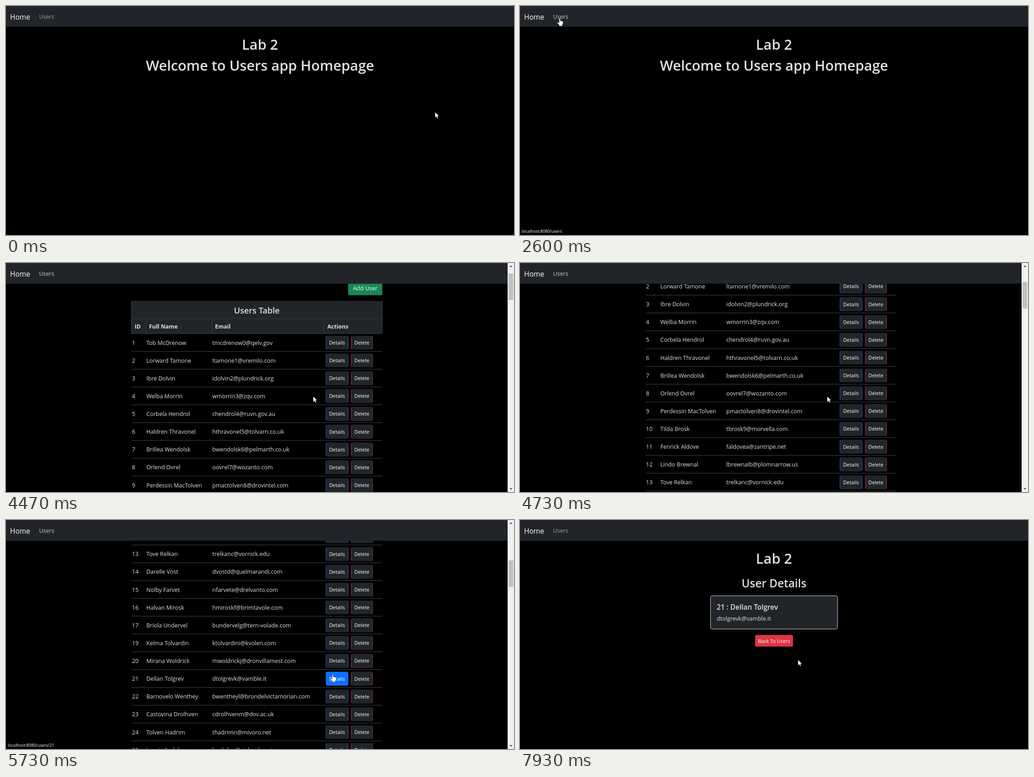
An HTML page that plays this animation: 1113x503 px, repeating every 8000 ms.

```html
<!DOCTYPE html>
<html lang="en">
<head>
<meta charset="utf-8">
<title>Users app</title>
<style>
@property --scroll { syntax: '<number>'; inherits: true; initial-value: 0; }
@property --hand { syntax: '<number>'; inherits: true; initial-value: 0; }

html, body { margin: 0; width: 100%; height: 100%; overflow: hidden; background: #000; }
svg { display: block; width: 100vw; height: 100vh; }
text { font: 12.5px 'Open Sans', 'Noto Sans', sans-serif; fill: #dee2e6; white-space: pre; }
.mid { text-anchor: middle; }
.h1 { font-size: 30.8px; font-weight: 600; }
.h2 { font-size: 24.4px; font-weight: 600; }
.h3 { font-size: 18.1px; font-weight: 600; }
.h5 { font-size: 15.4px; font-weight: 600; }
.th { font-size: 12.4px; font-weight: 700; }
.brand { font-size: 15.5px; }
.small { font-size: 10.9px; }
.status { font-size: 9.1px; }
.brand, .small, .status, .white { fill: #fff; }
.panel { fill: #212529; }
.rule { fill: none; stroke: #373b3e; }
.line { stroke: #41464b; }

/* 120 steps per loop; one step is 0.8333% */
svg, .home, .users, .details, .link, .up, .hot, .status, #cursor {
  animation: 8s step-end -4ms infinite;
}
svg { animation-name: scroll; }
.home { animation-name: home; }
.users { animation-name: users; }
.details { animation-name: details; }
.link { fill: #fff; animation-name: link; }
.up { animation-name: up; }
.hot { animation-name: hot; }
.list-url { animation-name: list-url; }
.item-url { animation-name: item-url; }
#cursor { animation-name: move, hand; }
#list { transform: translateY(calc(var(--scroll) * -1px)); }
#thumb { transform: translateY(calc(var(--scroll) * .1153px)); }
#arrow { opacity: calc(1 - var(--hand)); }
#pointer { opacity: var(--hand); }

@keyframes home { 0% { opacity: 1 } 37.5%, to { opacity: 0 } }
@keyframes users { 0% { opacity: 0 } 37.5% { opacity: 1 } 90%, to { opacity: 0 } }
@keyframes details { 0% { opacity: 0 } 90%, to { opacity: 1 } }
@keyframes link { 0% { fill-opacity: .55 } 27.5% { fill-opacity: .75 } 90%, to { fill-opacity: .55 } }
@keyframes up { 0% { fill: #a3a3a3 } 52.5%, to { fill: #505050 } }
@keyframes hot {
  0%, 75.833% { fill: #212529 }
  67.5%, 85.833%, to { fill: #0d6efd }
}
@keyframes hand {
  0%, 41.667%, 75.833%, 90%, to { --hand: 0 }
  28.333%, 67.5%, 85.833% { --hand: 1 }
}
@keyframes list-url {
  0%, 30.833% { opacity: 0; animation-timing-function: steps(3, start) }
  33.333%, 46.667% { opacity: 1; animation-timing-function: steps(3, start) }
  49.167%, to { opacity: 0 }
}
@keyframes item-url {
  0%, 70%, 80.833%, 87.5% { opacity: 0; animation-timing-function: steps(3, start) }
  72.5%, 78.333%, 90%, 90.833% { opacity: 1; animation-timing-function: steps(3, start) }
  93.333%, to { opacity: 0 }
}
@keyframes scroll {
  0%, 52.5% { --scroll: 0; animation-timing-function: steps(4, start) }
  55.833% { --scroll: 81.5; animation-timing-function: steps(1, start) }
  56.667% { --scroll: 82.3; animation-timing-function: steps(4, start) }
  60%, 60.833% { --scroll: 245; animation-timing-function: steps(4, start) }
  64.167% { --scroll: 634; animation-timing-function: steps(3, start) }
  66.667%, to { --scroll: 652 }
}
@keyframes move {
  0%, 9.167% { transform: translate(940px, 233px); animation-timing-function: steps(5, start) }
  13.333% { transform: translate(720px, 430px); animation-timing-function: steps(2, start) }
  15% { transform: translate(590px, 450px); animation-timing-function: steps(6, start) }
  20% { transform: translate(60px, 81px); animation-timing-function: steps(3, start) }
  22.5% { transform: translate(1px, 24px); animation-timing-function: steps(2, start) }
  24.167% { transform: translate(70px, 2px); animation-timing-function: steps(3, start) }
  26.667% { transform: translate(174px, 12px); animation-timing-function: steps(4, start) }
  30%, 41.667% { transform: translate(87px, 27px); animation-timing-function: steps(6, start) }
  46.667% { transform: translate(498px, 319px); animation-timing-function: steps(2, start) }
  48.333% { transform: translate(678px, 322px); animation-timing-function: steps(2, start) }
  50%, 60.833% { transform: translate(673px, 293px); animation-timing-function: steps(4, start) }
  64.167% { transform: translate(670px, 296px); animation-timing-function: steps(5, start) }
  68.333% { transform: translate(712px, 336px); animation-timing-function: steps(4, start) }
  71.667%, 75.833% { transform: translate(716px, 339px); animation-timing-function: steps(5, start) }
  80% { transform: translate(690px, 300px); animation-timing-function: steps(3, start) }
  82.5% { transform: translate(684px, 310px); animation-timing-function: steps(3, start) }
  85% { transform: translate(693px, 323px); animation-timing-function: steps(2, start) }
  86.667%, 96.667% { transform: translate(716px, 339px); animation-timing-function: steps(4, start) }
  to { transform: translate(609px, 307px) }
}
</style>
</head>
<body>
<svg viewBox="0 0 1113 503">
  <g class="home">
    <text class="h1 mid" x="556.5" y="96">Lab 2</text>
    <text class="h1 mid" x="556.5" y="142">Welcome to Users app Homepage</text>
  </g>

  <g class="users">
    <g id="list">
      <text class="h1 mid" x="549.5" y="96">Lab 2</text>
      <rect x="749.5" y="122" width="75" height="31" rx="3.5" fill="#198754"/>
      <text class="white mid" x="787" y="142.3">Add User</text>
      <rect class="panel" x="274.5" y="166.5" width="550" height="71"/>
      <path class="rule" d="M274.5 166.5h550v71h-550zM274.5 204.5h550M306.5 204.5v33M451.5 204.5v33M696.5 204.5v33"/>
      <text class="h3 mid" x="549.5" y="193">Users Table</text>
      <text class="th" x="282" y="226">ID</text>
      <text class="th" x="313.5" y="226">Full Name</text>
      <text class="th" x="458" y="226">Email</text>
      <text class="th" x="704" y="226">Actions</text>
      <g id="rows"></g>
    </g>
  </g>

  <g class="details">
    <text class="h1 mid" x="556.5" y="96">Lab 2</text>
    <text class="h2 mid" x="556.5" y="148">User Details</text>
    <rect class="panel" x="417.5" y="166.5" width="278" height="73" rx="3" stroke="#d3d4d5"/>
    <text class="h5" id="card-name" x="431" y="196.5"></text>
    <text id="card-mail" x="431" y="221"></text>
    <rect x="515" y="252.5" width="83" height="25.5" rx="2.5" fill="#dc3545"/>
    <text class="small mid" x="556.5" y="269.5">Back To Users</text>
  </g>

  <rect class="panel" width="1113" height="45.5"/>
  <text class="brand" x="9" y="29.5">Home</text>
  <text class="link" x="72.5" y="28">Users</text>

  <g class="users">
    <rect x="1099" width="14" height="503" fill="#f1f1f1"/>
    <rect id="thumb" x="1101" y="13.5" width="10.5" height="58" fill="#c1c1c1"/>
    <path class="up" d="M1103 8.5h6.5l-3.25-3.5z"/>
    <path d="M1103 494.5h6.5l-3.25 3.5z" fill="#505050"/>
  </g>

  <text class="status list-url" x="4" y="498">localhost:8080/users</text>
  <text class="status item-url" x="4" y="498">localhost:8080/users/21</text>

  <g id="cursor" fill="#fff" stroke="#000" stroke-width=".6">
    <path id="arrow" d="M0 0V12.4L2.9 9.8 4.9 14.2 7 13.3 5.1 9H9Z"/>
    <path id="pointer" d="M-1.3 .8Q0 -.6 1.3 .8V5.2L6 6.4Q7.8 7 7.6 9L6.8 13 5.6 14.4V17H-1.2V14.8L-5.2 10.2Q-5.6 8.4 -3.8 8.6L-1.3 10.2Z"/>
  </g>
</svg>
<script>
const people = `1 Tob McDrenow qelv.gov
2 Lorward Tamone vremilo.com
3 Ibre Dolvin plundrick.org
4 Welba Morrin zqv.com
5 Corbela Hendrol ruvn.gov.au
6 Haldren Thravonel tolvarn.co.uk
7 Brillea Wendolsk pelmarth.co.uk
8 Orlend Ovrel wozanto.com
9 Perdessin MacTolven drovintel.com
10 Tilda Brosk morvella.com
11 Fenrick Aldove zantripe.net
12 Lindo Brewnal plomnarrow.us
13 Tove Relkan vornick.edu
14 Darelle Vost quelmarandi.com
15 Nolby Farvet drelvanto.com
16 Halvan Mirosk brimtavole.com
17 Briola Undervel tern-volade.com
19 Kelma Tolvardin kvolen.com
20 Mirana Woldrick dronvillamest.com
21 Dellan Tolgrev vamble.it
22 Barnovelo Wenthey brondelvictamorian.com
23 Castovina Drolhven dov.ac.uk
24 Tolven Hadrim mivoro.net
25 Lurnis Agdole ziplendo.net`.split('\n').map(line => {
  const [id, first, last, domain] = line.split(' ');
  const tag = (id - 1).toString(36);
  return { id, name: `${first} ${last}`, mail: `${first[0]}${last}${tag}@${domain}`.toLowerCase() };
});

const text = (x, y, s) => `<text x="${x}" y="${y}">${s}</text>`;

const button = (x, w, color, label, hot) => `
  <rect x="${x}" y="-15" width="${w}" height="30" rx="3" fill="${color}"/>
  <rect class="panel ${hot ? 'hot' : ''}" x="${x + 1}" y="-15" width="${w - 2}" height="30" rx="2"/>
  <text class="small mid" x="${x + w / 2}" y="4">${label}</text>`;

const row = ({ id, name, mail }, i) => `<g transform="translate(0 ${257.3 + 39.12 * i})">
  ${text(276, 4.6, id)}${text(307.5, 4.6, name)}${text(452, 4.6, mail)}
  ${button(700.5, 49.5, '#1b5fc9', 'Details', id === '21')}
  ${button(756, 47.5, '#b8303e', 'Delete')}
  <path class="line" d="M275 19.2h549.5"/></g>`;

const byId = id => document.getElementById(id);
byId('rows').innerHTML = people.map(row).join('');

const chosen = people.find(p => p.id === '21');
byId('card-name').textContent = `${chosen.id} : ${chosen.name}`;
byId('card-mail').textContent = chosen.mail;
</script>
</body>
</html>
```
